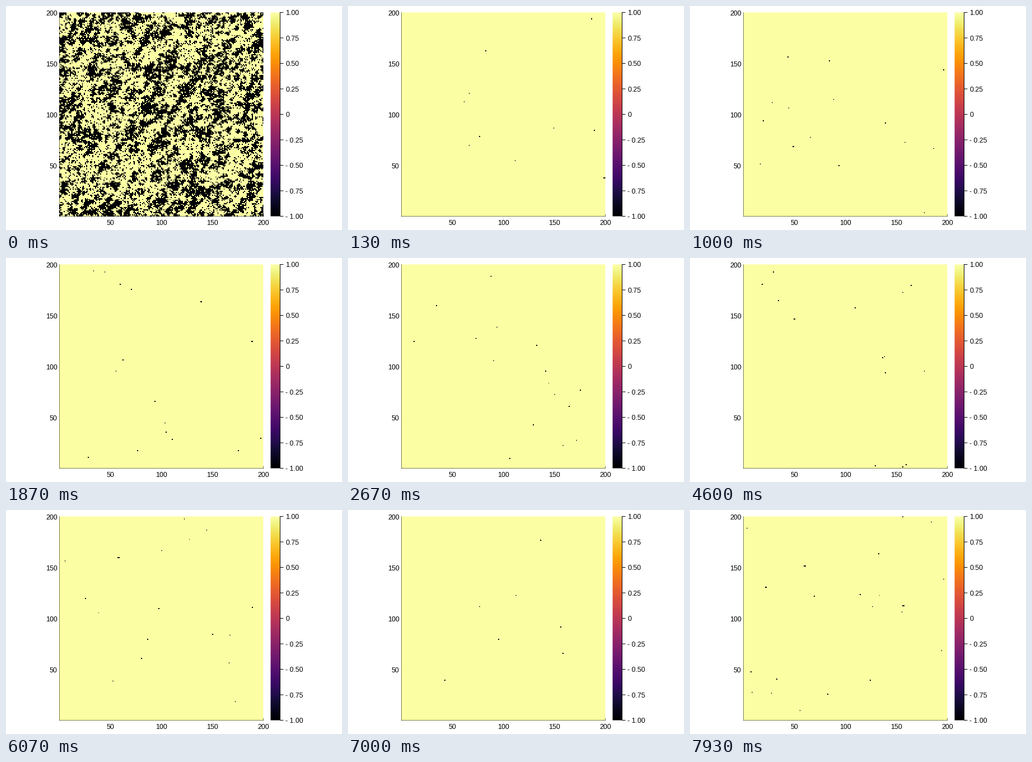
Animation, 600 px wide and 400 px high, one loop 8000 ms. Source, as a matplotlib script:

```python
import math
import random

import numpy as np
import matplotlib
import matplotlib.pyplot as plt
from matplotlib.animation import FuncAnimation
from matplotlib.lines import Line2D
from matplotlib.transforms import IdentityTransform

W, H, DPI = 600, 400, 100
N, SIDE = 200, 364            # lattice cells and their extent in pixels
LEFT, TOP = 95.5, 11.5        # heatmap edges run through pixel centres
RIGHT, BOTTOM = LEFT + SIDE, TOP + SIDE
BAR_LEFT, BAR_RIGHT = 472.5, 489.5
FONT_PX = 12.4
LOOP, INTERVAL, STEPS = 8000, 20, 120
TEMPERATURE, UP_SHARE = 1.0, 0.52

matplotlib.rcParams["font.family"] = "Liberation Sans"
inferno = matplotlib.colormaps["inferno"]
DOWN, UP = inferno([0.0, 1.0], bytes=True)


def quench():
    """Random spins after one ordered Metropolis sweep."""
    rng = random.Random(4)
    s = [[1 if rng.random() < UP_SHARE else -1 for _ in range(N)]
         for _ in range(N)]
    for y in range(N):
        for x in range(N):
            around = (s[y - 1][x] + s[(y + 1) % N][x]
                      + s[y][x - 1] + s[y][(x + 1) % N])
            cost = 2 * s[y][x] * around
            if cost <= 0 or rng.random() < math.exp(-cost / TEMPERATURE):
                s[y][x] = -s[y][x]
    return np.array(s) > 0


def settled(step):
    """All spins up but for rare thermal flips, now and then in pairs."""
    rng = np.random.default_rng(step)
    up = np.ones((N, N), bool)
    for _ in range(rng.poisson(13)):
        x, y = rng.integers(0, N, 2)
        up[y, x] = False
        if rng.random() < 0.08:
            up[y, (x + 1) % N] = False
    return up


def soften(rgba):
    """Border pixels are half covered by the picture."""
    rgba[[0, -1], :, 3] //= 2
    rgba[:, [0, -1], 3] //= 2
    return rgba


START = quench()
CELL = np.minimum(np.arange(SIDE + 1) * N // SIDE, N - 1)


def picture(step):
    up = START if step == 0 else settled(step)
    up = up[::-1][np.ix_(CELL, CELL)]
    return soften(np.where(up[..., None], UP, DOWN))


fig = plt.figure(figsize=(W / DPI, H / DPI), dpi=DPI, facecolor="white")


def line(x0, y0, x1, y1, zorder):
    fig.add_artist(Line2D([x0, x1], [H - y0, H - y1], color="black",
                          lw=72 / DPI, zorder=zorder, snap=False,
                          solid_capstyle="butt", transform=IdentityTransform()))


def label(x, y, text, ha):
    fig.text(x / W, 1 - y / H, text, ha=ha, va="baseline",
             size=FONT_PX * 72 / DPI, color="black")


def place(rgba, x, zorder):
    return fig.figimage(rgba, int(x), H - int(BOTTOM) - 1,
                        origin="upper", zorder=zorder)


# The heatmap lies over its axes, the colour bar under its own.
line(LEFT, TOP, LEFT, BOTTOM + 0.5, 0)
line(LEFT - 0.5, BOTTOM, RIGHT + 0.5, BOTTOM, 0)
line(RIGHT, BOTTOM - 4, RIGHT, BOTTOM, 0)
grid = place(picture(0), LEFT, 1)

for v in range(50, N + 1, 50):
    offset = (v - 0.5) * SIDE / N
    label(LEFT + offset + 0.6, 390.6, str(v), "center")
    label(91.7, BOTTOM - offset + 5, str(v), "right")

ramp = inferno(np.linspace(1, 0, SIDE + 1), bytes=True)[:, None]
bar_width = int(BAR_RIGHT - BAR_LEFT) + 1
place(soften(np.repeat(ramp, bar_width, axis=1)), BAR_LEFT, 1)

line(BAR_RIGHT, TOP - 0.5, BAR_RIGHT, BOTTOM + 0.5, 2)
for k in range(9):
    v = 1 - k / 4
    y = TOP + k * SIDE / 8
    line(BAR_RIGHT, y, BAR_RIGHT + 6, y, 2)
    text = "0" if v == 0 else ("- " if v < 0 else "") + f"{abs(v):.2f}"
    label(499, y + 4.6, text, "left")


def update(frame):
    step = (frame * INTERVAL + 15) * STEPS // LOOP
    grid.set_data(picture(min(step, STEPS - 1)))
    return [grid]


anim = FuncAnimation(fig, update, frames=LOOP // INTERVAL, interval=INTERVAL,
                     init_func=lambda: update(0), repeat=True, repeat_delay=0)
plt.show()
```
